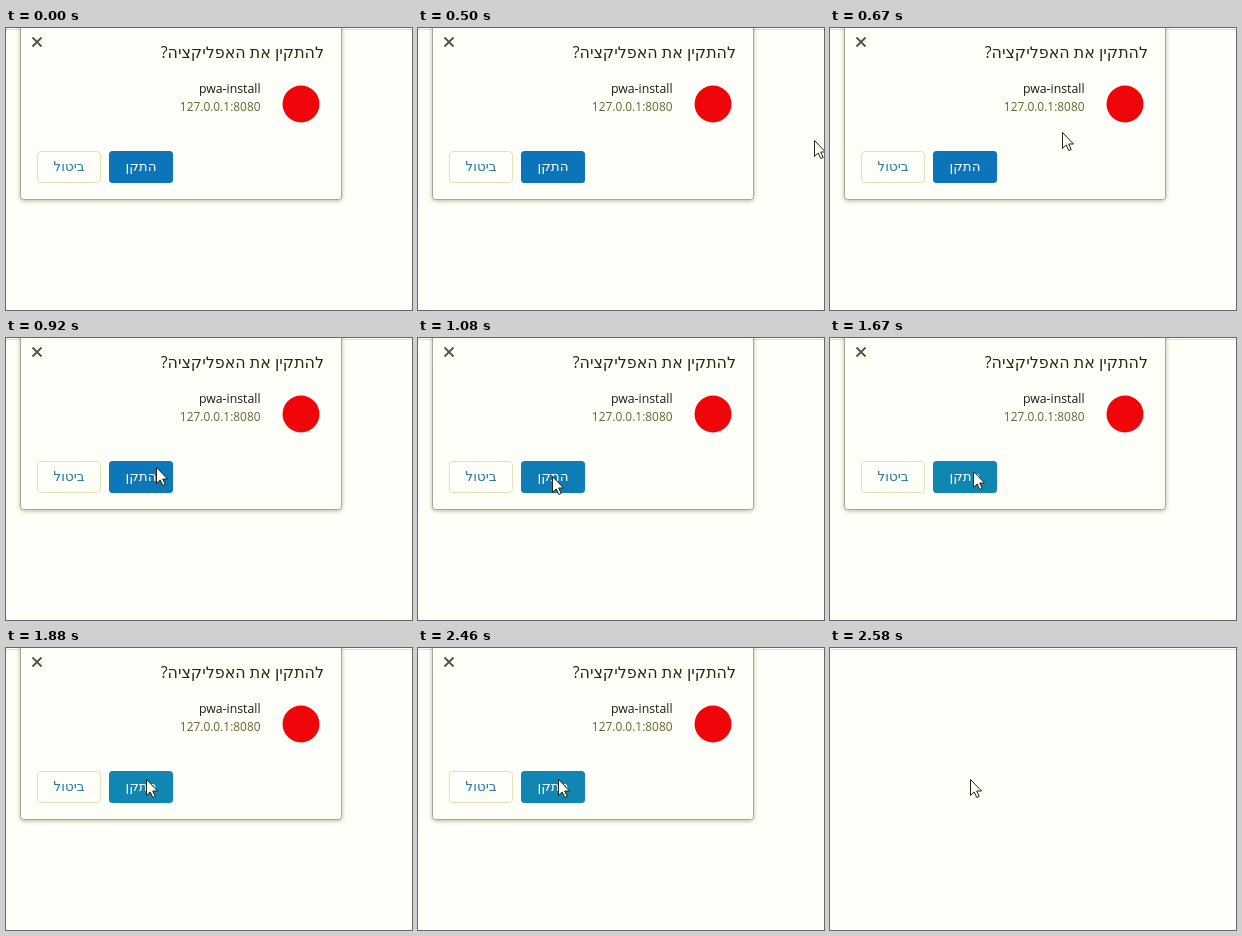
These frames come from a looping animation (406x282 px, 2.87 s). An HTML page:

```html
<!DOCTYPE html>
<html lang="he">
<head>
<meta charset="utf-8">
<style>
  html, body { margin: 0; height: 100%; overflow: hidden; background: #fffffa; }
  svg { display: block; width: 406px; height: 282px; }
  text { font-family: "Open Sans", "Noto Sans", "DejaVu Sans", sans-serif; }
  .shadow { filter: drop-shadow(0 1px 2px #88885599); }
  .button { font-size: 13.5px; text-anchor: middle; }
</style>
</head>
<body>
<svg viewBox="0 0 406 282">
  <rect width="406" height="282" fill="#fffffa"/>
  <path d="M0 1.5H406" stroke="#deded2"/>
  <g id="dialog">
    <rect class="shadow" x="14.5" y="-6" width="321" height="177.5" rx="3" fill="#fffffa" stroke="#a8a890"/>
    <path d="M26.5 9.5l9 9m0-9l-9 9" stroke="#55553a" stroke-width="1.8"/>
    <text x="318" y="30" font-size="15.9" direction="rtl" fill="#2b2b08">להתקין את האפליקציה?</text>
    <text x="254.500" y="65" font-size="12.3" text-anchor="end" fill="#1c1c10">pwa-install</text>
    <text x="254.500" y="83" font-size="11.9" text-anchor="end" fill="#66662c">127.0.0.1:8080</text>
    <circle cx="295" cy="76" r="18.500" fill="#f0060a"/>
    <rect x="31.5" y="123.5" width="63" height="31" rx="3.5" fill="#fffffa" stroke="#e2e2b4"/>
    <text class="button" x="63" y="143" fill="#2478a4">ביטול</text>
    <rect id="install" x="103" y="123" width="64" height="32" rx="3.5"/>
    <text class="button" x="135" y="143" fill="#fff">התקן</text>
  </g>
  <path id="cursor" d="M.5.5V16.500L4.200 13L6.800 18.500L9.200 17.400L6.700 12H11.500Z" fill="#fffff4" stroke="#222218"/>
</svg>
<script>
const LOOP = 2870, FPS = 24;
// Pointer path: [step, x, y]
const path = [[12, 396, 112], [14, 300, 103], [16, 232, 104], [18, 192, 112], [20, 163, 123],
  [24, 136, 135], [26, 134, 138], [32, 137, 135], [37, 138, 135], [40, 143, 133], [45, 140, 131]];
const [dialog, install, cursor] = ["dialog", "install", "cursor"].map(id => document.getElementById(id));

function pointerAt(step) {
  const i = path.findIndex(p => p[0] >= step);
  if (i < 0) return path.at(-1).slice(1);
  if (i === 0) return path[0].slice(1);
  const a = path[i - 1], b = path[i], k = (step - a[0]) / (b[0] - a[0]);
  return [1, 2].map(j => Math.round(a[j] + (b[j] - a[j]) * k));
}

function draw(now) {
  const step = Math.floor((now % LOOP) * FPS / 1000 + 0.1);
  const [x, y] = pointerAt(step);
  const hover = Math.min(1, Math.max(0, (step - 20) / 12));
  cursor.setAttribute("transform", `translate(${x} ${y})`);
  cursor.style.visibility = step < 12 ? "hidden" : "visible";
  install.setAttribute("fill", `rgb(${12 + 4 * hover},${116 + 18 * hover},${184 - 6 * hover})`);
  dialog.style.opacity = step < 61 ? 1 : step < 62 ? 0.4 : 0;
  requestAnimationFrame(draw);
}
draw(performance.now());
</script>
</body>
</html>
```
